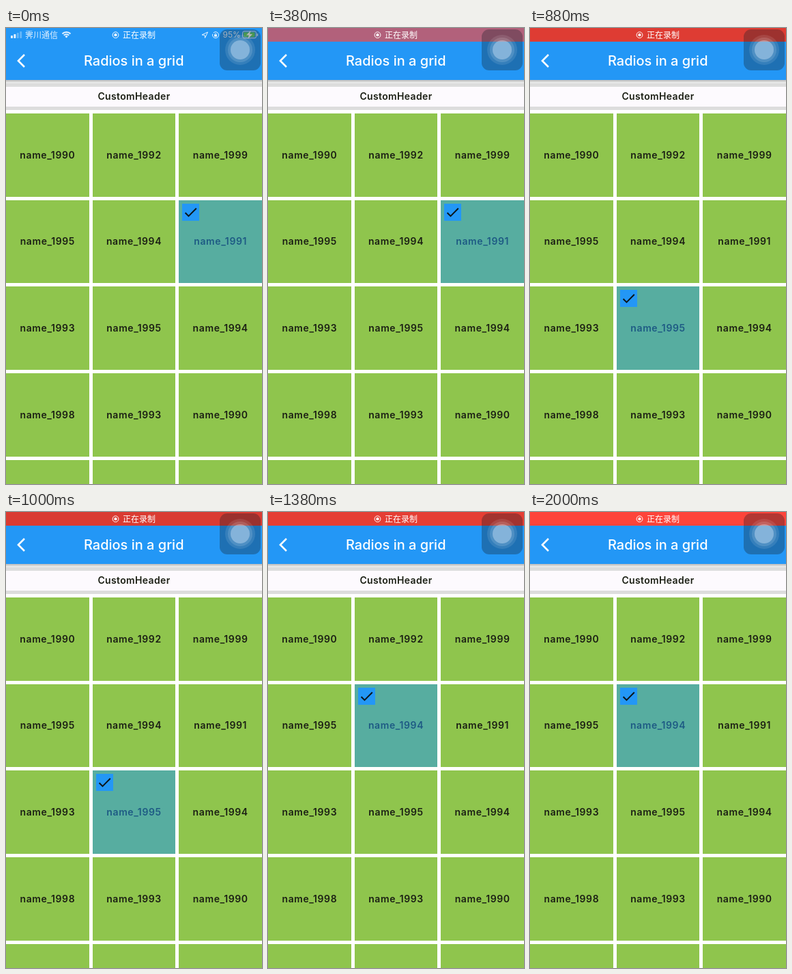
An HTML page with a canvas that plays this animation: 375 by 667 pixels, repeating every 2120 ms.

```html
<!DOCTYPE html>
<html lang="zh">
<head>
<meta charset="utf-8">
<title>Radios in a grid</title>
<style>
html, body { margin: 0; width: 100%; height: 100%; overflow: hidden; background: #fff; }
canvas { display: block; width: 375px; height: 667px; }
</style>
</head>
<body>
<canvas id="stage"></canvas>
<script>
const W = 375, H = 667, LOOP = 2120;
const BLUE = '#2397f6', GREEN = '#8fc54d', INK = '#1b1f14', PALE = '#e6f3ff';
const LATIN = 'Inter, Roboto, sans-serif';
const CJK = '"Noto Sans CJK SC", "Noto Sans CJK", sans-serif';
const GAP = 5, CELL = (W - 2 * GAP) / 3, TOP = 125;
const ENDINGS = '029541354830';

const canvas = document.getElementById('stage');
const ctx = canvas.getContext('2d');
const dpr = window.devicePixelRatio || 1;
canvas.width = W * dpr;
canvas.height = H * dpr;

function rect(x, y, w, h, color) {
  ctx.fillStyle = color;
  ctx.fillRect(x, y, w, h);
}

function roundRect(x, y, w, h, r, color) {
  ctx.fillStyle = color;
  ctx.beginPath();
  ctx.roundRect(x, y, w, h, r);
  ctx.fill();
}

function disc(x, y, r, color) {
  ctx.fillStyle = color;
  ctx.beginPath();
  ctx.arc(x, y, r, 0, Math.PI * 2);
  ctx.fill();
}

function ring(x, y, r, width, from = 0, to = Math.PI * 2) {
  ctx.lineWidth = width;
  ctx.beginPath();
  ctx.arc(x, y, r, from, to);
  ctx.stroke();
}

function trace(points) {
  ctx.beginPath();
  points.forEach(([x, y], i) => i ? ctx.lineTo(x, y) : ctx.moveTo(x, y));
}

function shape(points, color) {
  ctx.fillStyle = color;
  trace(points);
  ctx.closePath();
  ctx.fill();
}

function label(text, x, y, font, color, align = 'center', spacing = 0) {
  ctx.font = font;
  ctx.letterSpacing = spacing + 'px';
  ctx.textAlign = align;
  ctx.textBaseline = 'alphabetic';
  ctx.fillStyle = color;
  ctx.fillText(text, x, y);
}

// The screen refreshes eight times a second, on whole hundredths.
function heldTime(t) {
  const tick = i => Math.round(12.5 * i) * 10;
  const i = Math.floor(t / 125);
  return tick(i) <= t ? tick(i) : tick(i - 1);
}

// The bar eases from blue to red, while the red slowly pulses.
function barColor(t) {
  const p = Math.min(1, t / 630);
  const mix = p * p * (3 - 2 * p);
  const glow = 0.925 - 0.075 * Math.cos(Math.PI * (t - 1080) / 800);
  const blend = (from, to) => Math.round(from + (to * glow - from) * mix);
  return `rgb(${blend(35, 255)}, ${blend(151, 69)}, ${blend(246, 58)})`;
}

function pickedCell(t) {
  if (t < 750) return 5;
  return t < 1380 ? 7 : 4;
}

function drawCell(index, picked) {
  const left = index % 3 * (CELL + GAP);
  const top = TOP + Math.floor(index / 3) * (CELL + GAP);
  const x = Math.round(left), y = Math.round(top);
  const w = Math.round(left + CELL) - x, h = Math.round(top + CELL) - y;
  rect(x, y, w, h, GREEN);
  if (index < ENDINGS.length) {
    label('name_199' + ENDINGS[index], left + CELL / 2, top + 65.7, '600 14px ' + LATIN, INK, 'center', 0.6);
  }
  if (!picked) return;
  rect(x, y, w, h, 'rgba(33,150,243,0.5)');
  rect(x + 5, y + 5, 25, 25, BLUE);
  ctx.strokeStyle = '#0b1418';
  ctx.lineWidth = 2;
  trace([[x + 9.6, y + 18.2], [x + 14.5, y + 23.1], [x + 25.8, y + 11.8]]);
  ctx.stroke();
}

function drawHeader() {
  const shade = ctx.createLinearGradient(0, 76, 0, 82);
  shade.addColorStop(0, 'rgba(0,0,0,0.27)');
  shade.addColorStop(1, 'rgba(0,0,0,0)');
  rect(0, 81, W, 39, '#dddddd');
  rect(0, 86, W, 29, '#fdfafe');
  rect(0, 76, W, 6, shade);
  label('CustomHeader', W / 2, 105.2, '600 14px ' + LATIN, INK, 'center', 0.35);

  rect(0, 20, W, 56, BLUE);
  label('Radios in a grid', 187.2, 55, '500 20px ' + LATIN, '#fff');
  ctx.strokeStyle = '#fff';
  ctx.lineWidth = 2.6;
  trace([[27, 39], [18, 48], [27, 57]]);
  ctx.stroke();
}

function drawSignal() {
  for (let i = 0; i < 4; i++) {
    const h = 4 + i * 2;
    roundRect(7 + i * 4.4, 15 - h, 3, h, 0.8, i < 2 ? PALE : 'rgba(230,243,255,0.35)');
  }
  label('霁川通信', 28, 14.6, '400 12px ' + CJK, PALE, 'left');
  for (const r of [1.5, 5.2, 8.5]) {
    ring(88.5, 14.5, r, r < 2 ? 3 : 2, -Math.PI * 0.75, -Math.PI * 0.25);
  }
}

function drawBattery() {
  label('95%', 317.5, 14.4, '400 12px ' + LATIN, PALE, 'left');
  ctx.lineWidth = 1;
  ctx.beginPath();
  ctx.roundRect(346.5, 4.8, 20, 10, 2.5);
  ctx.stroke();
  roundRect(348, 6.3, 16.5, 7, 1.2, '#63cf68');
  roundRect(367.7, 8, 1.4, 4, 0.7, PALE);
  shape([[358.5, 3.8], [352, 10.6], [355.8, 10.6], [354.3, 16], [361, 9], [357, 9]], '#fff');
}

function drawIcons(alpha) {
  ctx.save();
  ctx.globalAlpha = alpha;
  ctx.strokeStyle = PALE;
  drawSignal();

  ctx.lineWidth = 1;
  trace([[287, 10], [295.5, 6], [291.5, 14.5], [291, 10.4]]);
  ctx.closePath();
  ctx.stroke();

  ring(307, 10.2, 4.5, 1, -Math.PI * 0.75, Math.PI * 1.1);
  rect(305, 9.5, 4, 3.2, PALE);
  ring(307, 9.4, 1.3, 0.8, Math.PI, Math.PI * 2);

  drawBattery();
  ctx.restore();
}

function drawStatus(t) {
  rect(0, 0, W, 20, barColor(t));
  if (t < 250) drawIcons(1 - t / 250);
  ctx.strokeStyle = '#fff';
  ring(160.5, 10.2, 4.4, 1);
  disc(160.5, 10.2, 2.1, '#fff');
  label('正在录制', 171, 14.6, '400 12px ' + CJK, '#fff', 'left');
}

function drawTouchButton() {
  roundRect(313, 2, 60, 60, 11, 'rgba(20,30,40,0.32)');
  disc(343, 32, 22, 'rgba(255,255,255,0.1)');
  disc(343, 32, 18, 'rgba(255,255,255,0.13)');
  disc(343, 32, 14, 'rgba(225,240,255,0.37)');
}

function draw(time) {
  const t = heldTime(time % LOOP);
  const picked = pickedCell(t);
  ctx.setTransform(dpr, 0, 0, dpr, 0, 0);
  rect(0, 0, W, H, '#fff');
  for (let i = 0; i < 15; i++) drawCell(i, i === picked);
  drawHeader();
  drawStatus(t);
  drawTouchButton();
}

const start = performance.now();
function loop() {
  draw(performance.now() - start);
  requestAnimationFrame(loop);
}
loop();
</script>
</body>
</html>
```
